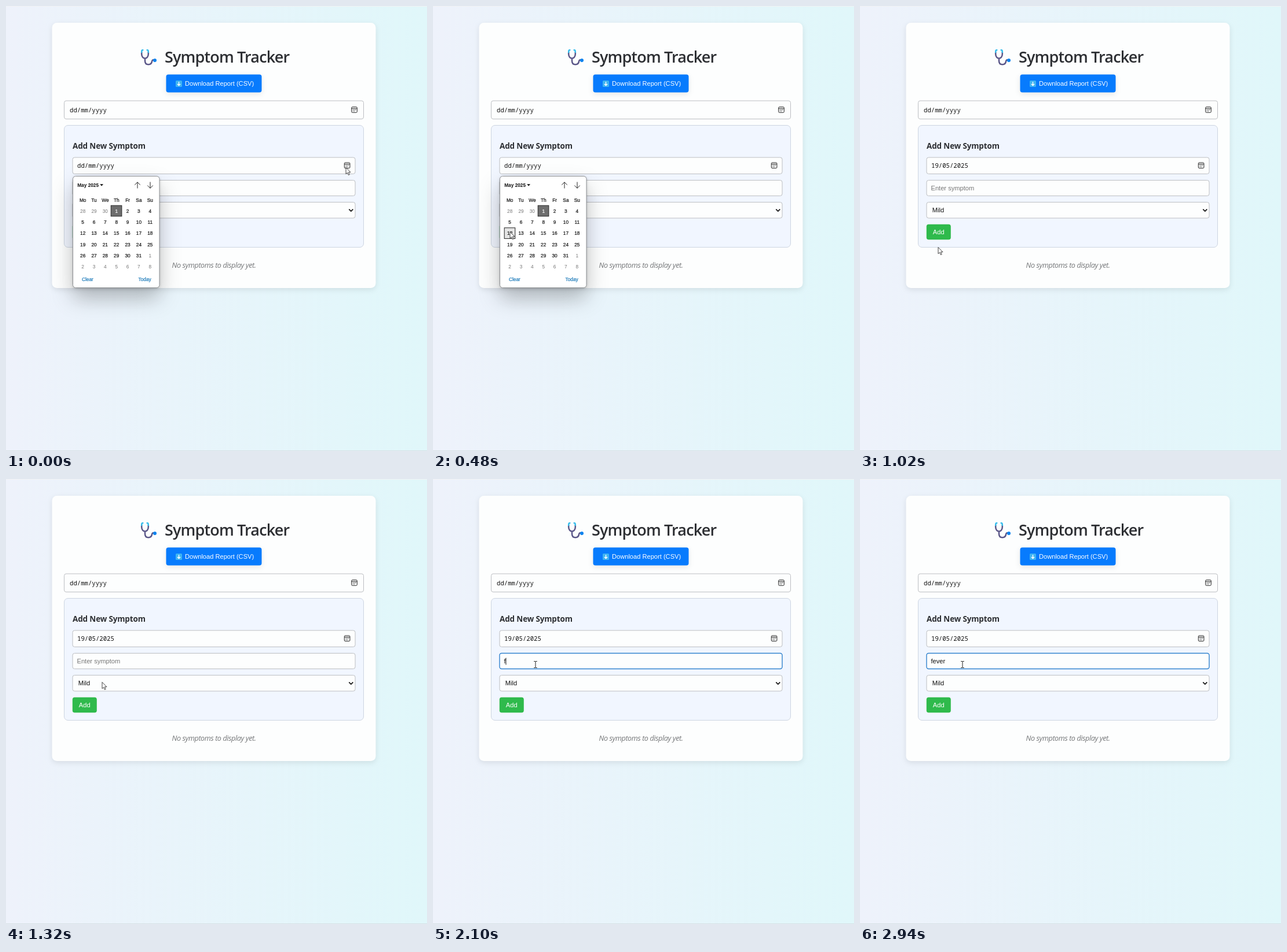
Animation of 727 by 770 pixels, one loop 3000 ms. Source, as an HTML page:

```html
<!DOCTYPE html>
<html lang="en">
<head>
<meta charset="utf-8">
<title>Symptom Tracker</title>
<style>
  html, body { margin: 0; width: 100%; height: 100%; overflow: hidden; }
  svg { display: block; width: 727px; height: 770px; background: linear-gradient(to right, #eef2fb, #e0f7fa); }
  text { font: 11.12px "Liberation Sans", Arial, sans-serif; fill: #111; white-space: pre; }
  .ui { font-family: "Open Sans", "Noto Sans", sans-serif; fill: #2d2f33; }
  .title { font-size: 27px; font-weight: 600; letter-spacing: -.86px; }
  .sub { font-size: 13.5px; font-weight: 700; letter-spacing: -.15px; }
  .note { font-size: 12.6px; font-style: italic; letter-spacing: -.4px; fill: #757779; }
  .date { font: 10.65px "Noto Sans Mono", "DejaVu Sans Mono", monospace; }
  .white { fill: #fff; }
  .hint { fill: #757575; }
  .mid { text-anchor: middle; }
  .field { fill: #fdfefe; stroke: #bcbec2; }
  .line { fill: none; stroke: #222; }
  #popup text { font-size: 8.3px; stroke: #111; stroke-width: .2px; }
  #popup .bold { font-weight: 700; stroke: none; }
  #popup .out { fill: #777; stroke: none; }
  #popup .link { fill: #1878b8; stroke: #1878b8; }
  #popup .picked { fill: #fff; stroke: #fff; }
  .card { filter: drop-shadow(0 3px 5px rgba(0, 0, 0, .09)); }
  .panel { filter: drop-shadow(0 18px 18px rgba(0, 0, 0, .22)) drop-shadow(0 1px 2px rgba(0, 0, 0, .18)); }
</style>
</head>
<body>
<svg viewBox="0 0 727 770">
  <defs>
    <g id="calIcon" class="line">
      <rect x=".5" y=".5" width="9.6" height="9.6" rx="1.6"/>
      <path d="M.5 3.1H10"/>
      <path d="M2.6 5.3H8.4M2.6 7.6H6.6" stroke-dasharray="1.3 .9"/>
    </g>
  </defs>
  <path d="M0 .5H727" stroke="#f1f2f3"/>
  <path d="M0 769.5H727" stroke="#d6e0e4"/>

  <rect class="card" x="79.5" y="29" width="559" height="459" rx="8.5" fill="#fdfefe"/>

  <g fill="none" stroke-linecap="round" stroke-width="2.5">
    <path stroke="#5a5688" d="M234.2 80V83C234.2 87.5 236.8 90.5 240 90.5S245.8 87.5 245.8 83V80M240 91V95C240 99.2 242.6 101.2 246 101.2C250 101.2 251.6 98.5 252 96C252.5 93 254 92.8 256 93.4"/>
    <path stroke="#34bdec" d="M236.4 76.2C234.6 76 234.2 77 234.2 80M243.6 76.2C245.4 76 245.8 77 245.8 80"/>
    <circle cx="257" cy="94" r="3" fill="#0d83ef" stroke="none"/>
  </g>
  <text class="ui title mid" x="381.6" y="98">Symptom Tracker</text>

  <rect class="card" x="276.5" y="118.5" width="165" height="31" rx="4" fill="#077bfd"/>
  <rect x="293" y="129" width="11" height="11" rx="1.6" fill="#3fb4f2"/>
  <path d="M298.5 131.2V137.3M295.9 135L298.5 137.6L301.1 135" fill="none" stroke="#fff" stroke-width="1.4"/>
  <text class="white" x="309" y="138.3">Download Report (CSV)</text>

  <rect class="field" x="100.5" y="164" width="517" height="31.5" rx="3.5"/>
  <text class="date" x="110" y="184">dd/mm/yyyy</text>
  <use href="#calIcon" x="596.2" y="174.2"/>

  <rect x="100.5" y="206.5" width="517" height="211" rx="6.5" fill="#f1f6ff" stroke="#cdd5e1"/>
  <text class="ui sub" x="115" y="247">Add New Symptom</text>

  <rect class="field" x="115" y="262" width="488" height="28.5" rx="3.5"/>
  <text class="date" id="day" x="123" y="280"></text>
  <use href="#calIcon" x="583.8" y="270.5"/>

  <rect class="field" id="entry" x="115" y="301.5" width="488" height="27" rx="3.5"/>
  <text id="typed" x="122.5" y="319.4"></text>
  <path id="caret" class="line" d="M0 309.5V321.5"/>

  <rect class="field" x="115" y="339.5" width="488" height="27.5" rx="3.5"/>
  <text x="124.7" y="357.2">Mild</text>
  <path d="M592.3 351.6L595.8 355L599.3 351.6" fill="none" stroke="#111" stroke-width="1.7"/>

  <rect x="114.8" y="377.8" width="42" height="26.4" rx="3.8" fill="#2fba4c"/>
  <text class="white" x="125.8" y="395">Add</text>

  <text class="ui note mid" x="359" y="453">No symptoms to display yet.</text>

  <g id="popup">
    <rect class="panel" x="115.5" y="294.5" width="149.5" height="193" rx="5" fill="#fff" stroke="#8b8e91"/>
    <text class="bold" x="123.2" y="313">May 2025</text>
    <path d="M162.3 308.3H168L165.15 311.5Z"/>
    <path class="line" d="M227 315.5V304.8M222.3 309.6L227 304.8L231.7 309.6M249 304.5V315.3M244.3 310.5L249 315.3L253.7 310.5"/>
    <rect id="hover" width="18.6" height="18.6" fill="#e5e5e5" stroke="#222"/>
    <g id="grid"></g>
    <text class="link" x="131" y="475.6">Clear</text>
    <text class="link" x="228.6" y="475.6">Today</text>
  </g>

  <path id="arrow" d="M0 0V11.2L2.6 8.9L4.4 13L6.2 12.2L4.5 8.2H8Z" fill="#fff" stroke="#222" stroke-width=".85"/>
  <path id="beam" class="line" d="M-2.8 -5.5H-.8L0 -5L.8 -5.5H2.8M0 -5V5M-2.8 5.5H-.8L0 5L.8 5.5H2.8"/>
</svg>
<script>
const LOOP = 3000, STEP = 60, CLOSE = 960, FOCUS = 1560;
const COL = 19.35, ROW = 19.3, LEFT = 123, TOP = 345.2;
const $ = id => document.getElementById(id);
const show = (el, on) => el.setAttribute("visibility", on ? "visible" : "hidden");
const moveTo = (el, x, y) => el.setAttribute("transform", `translate(${x} ${y})`);

// time, x, y of the pointer
const path = [
  [0, 587, 279.5], [60, 587, 279.5], [420, 133, 390], [540, 133, 391.5],
  [720, 135, 417.5], [1020, 135, 417.5], [1260, 166, 351.5],
  [1380, 166, 351.5], [1560, 177, 321], [LOOP, 177, 321]
];
// time, typed text
const typing = [[0, ""], [2100, "f"], [2220, "fe"], [2340, "fev"], [2520, "feve"], [2640, "fever"]];
// time, caret visible
const blink = [[0, 0], [FOCUS, 1], [1740, 0], [1920, 1], [2820, 0]];

const valueAt = (table, t) => table.filter(row => row[0] <= t).pop()[1];

function pointerAt(t) {
  const i = path.findIndex(p => p[0] > t);
  const [t0, x0, y0] = path[i - 1], [t1, x1, y1] = path[i];
  const u = (t - t0) / (t1 - t0), e = u * u * (3 - 2 * u);
  return [x0 + (x1 - x0) * e, y0 + (y1 - y0) * e];
}

function buildGrid() {
  const cell = (label, col, row, cls) =>
    `<text class="mid ${cls}" x="${LEFT + COL * (col + .5)}" y="${TOP + ROW * (row + .5) + 3}">${label}</text>`;
  let out = `<rect x="${LEFT + COL * 3 + .2}" y="${TOP}" width="18.6" height="18.6" fill="#6e6e6e" stroke="#222"/>`;
  ["Mo", "Tu", "We", "Th", "Fr", "Sa", "Su"].forEach((d, i) => out += cell(d, i, -1, ""));
  for (let i = 0; i < 42; i++) {
    const date = new Date(2025, 3, 28 + i);
    const cls = date.getMonth() !== 4 ? "out" : date.getDate() === 1 ? "picked" : "";
    out += cell(date.getDate(), i % 7, Math.floor(i / 7), cls);
  }
  $("grid").innerHTML = out;
}

function draw(t) {
  const [x, y] = pointerAt(t), open = t < CLOSE, focused = t >= FOCUS;
  show($("popup"), open);
  const col = Math.floor((x - LEFT) / COL), row = Math.floor((y - TOP) / ROW);
  show($("hover"), open && col >= 0 && col < 7 && row >= 0 && row < 6);
  $("hover").setAttribute("x", LEFT + col * COL + .2);
  $("hover").setAttribute("y", TOP + row * ROW);

  $("day").textContent = open ? "dd/mm/yyyy" : "19/05/2025";
  $("entry").style.stroke = focused ? "#3182ce" : "";
  $("entry").style.strokeWidth = focused ? 1.4 : 1;

  const text = valueAt(typing, t);
  $("typed").textContent = text || "Enter symptom";
  $("typed").setAttribute("class", text ? "" : "hint");
  show($("caret"), valueAt(blink, t));
  moveTo($("caret"), 122.5 + (text ? $("typed").getComputedTextLength() + .4 : 0), 0);

  const overText = !open && y > 301 && y < 329;
  show($("arrow"), !overText);
  show($("beam"), overText);
  moveTo($("arrow"), x, y);
  moveTo($("beam"), x, y);
}

buildGrid();
const start = performance.now();
function tick() {
  const t = (performance.now() - start) % LOOP;
  draw(Math.floor(t / STEP) * STEP);
  requestAnimationFrame(tick);
}
tick();
</script>
</body>
</html>
```
